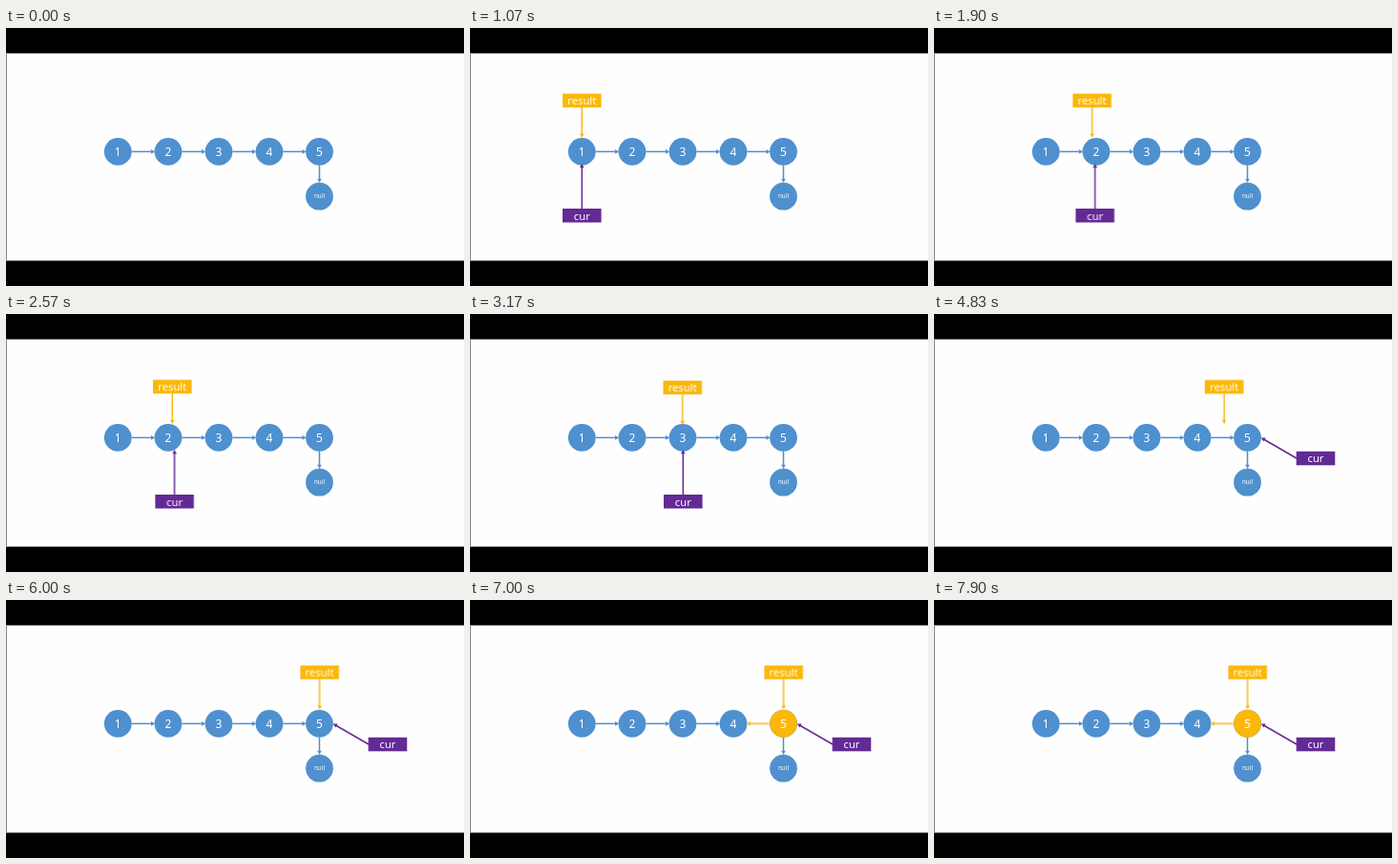
These frames come from a looping animation (480x270 px, 8000 ms). An HTML page:

```html
<!DOCTYPE html>
<html lang="en">
<head>
<meta charset="utf-8">
<title>Linked list recursion</title>
<style>
  html, body { margin: 0; width: 100%; height: 100%; overflow: hidden; background: #000; }
  svg { display: block; width: 100vw; height: 100vh; }
  text { font-family: "Noto Sans", "Open Sans", sans-serif; text-anchor: middle; fill: #fff; font-size: 11.2px; }
  .digit { font-size: 12px; }
  .null { font-size: 6.3px; }
  .blue { --ink: #4f90cf; }
  .gold { --ink: #fab80c; }
  .purple { --ink: #632a95; }
  circle, rect.tag, .head { fill: var(--ink); }
  .line { stroke: var(--ink); stroke-width: 1.5; }

  .anim { animation: 8s cubic-bezier(.37, 0, .63, 1) infinite both; }
  #result { animation-name: result-move, appear; }
  #cur { animation-name: cur-move, cur-below; }
  #cur-side { animation-name: cur-beside; }
  #gold-node { animation-name: node-return; }
  #forward { animation-name: link-drop; }
  #backward { animation-name: link-back; }

  @keyframes result-move {
    0%, 17.66% { transform: translate(117.3px, 68.7px); }
    25.16%, 30.75% { transform: translate(170px, 68.7px); }
    38.25%, 43.88% { transform: translate(222.8px, 69.7px); }
    51.38%, 56.48% { transform: translate(276px, 69.7px); }
    63.98%, 100% { transform: translate(328.7px, 68.4px); }
  }
  @keyframes cur-move {
    0%, 17% { transform: translateX(117.3px); }
    24.5%, 30.4% { transform: translateX(170px); }
    37.9%, 43.5% { transform: translateX(223.3px); }
    51%, 100% { transform: translateX(276px); }
  }
  @keyframes appear {
    0%, 4.5% { opacity: 0; }
    6%, 100% { opacity: 1; }
  }
  @keyframes cur-below {
    0%, 4.5% { opacity: 0; }
    6%, 55.99% { opacity: 1; }
    56%, 100% { opacity: 0; }
  }
  @keyframes cur-beside {
    0%, 55.99% { opacity: 0; }
    56%, 100% { opacity: 1; }
  }
  @keyframes node-return {
    0%, 78% { opacity: 0; }
    80%, 100% { opacity: 1; }
  }
  @keyframes link-drop {
    0%, 86.99% { opacity: 1; }
    87%, 100% { opacity: 0; }
  }
  @keyframes link-back {
    0%, 86.99% { opacity: 0; }
    87%, 100% { opacity: 1; }
  }
</style>
</head>
<body>
<svg viewBox="0 0 480 270" preserveAspectRatio="none">
  <rect y="26.5" width="480" height="217" fill="#fefefe"/>
  <rect y="26.5" width="1" height="217" fill="#888"/>
  <g id="stage"></g>
</svg>
<script>
  const nodeX = [117.3, 170, 223, 276, 328.5];
  const midY = 129.4;

  function arrow(x1, y1, x2, y2) {
    const angle = Math.atan2(y2 - y1, x2 - x1) * 180 / Math.PI;
    const length = Math.hypot(x2 - x1, y2 - y1);
    return `<g transform="translate(${x1} ${y1}) rotate(${angle})">
      <path class="line" d="M0 0H${length - 3}"/>
      <path class="head" d="M${length} 0l-4.2 -2.3v4.6z"/></g>`;
  }

  const node = (x, y, label, style = 'digit') =>
    `<circle cx="${x}" cy="${y}" r="14.4"/>
     <text class="${style}" x="${x}" y="${y + (style === 'null' ? 2 : 4.6)}">${label}</text>`;

  const tag = (x, y, label) =>
    `<rect class="tag" x="${x - 20.3}" y="${y}" width="40.6" height="14.5"/>
     <text x="${x}" y="${y + 11.5}">${label}</text>`;

  const group = (id, color, content) =>
    `<g id="${id}" class="anim ${color}">${content}</g>`;

  const link = i => arrow(nodeX[i] + 14.4, midY, nodeX[i + 1] - 13.8, midY);

  document.getElementById('stage').innerHTML = [
    `<g class="blue">`,
    ...nodeX.map((x, i) => node(x, midY, i + 1)),
    node(328.5, 176.2, 'null', 'null'),
    [0, 1, 2].map(link).join(''),
    arrow(328.5, 143.5, 328.5, 162),
    `</g>`,
    group('forward', 'blue', link(3)),
    group('gold-node', 'gold', node(nodeX[4], midY, 5)),
    group('backward', 'gold', arrow(nodeX[4] - 14.4, midY, nodeX[3] + 14, midY)),
    group('result', 'gold', arrow(0, 14, 0, 46.3) + tag(0, 0, 'result')),
    group('cur', 'purple', arrow(0, 190, 0, 142) + tag(0, 189, 'cur')),
    group('cur-side', 'purple', arrow(380, 151, 342.8, 129.5) + tag(400, 143.8, 'cur'))
  ].join('');
</script>
</body>
</html>
```
